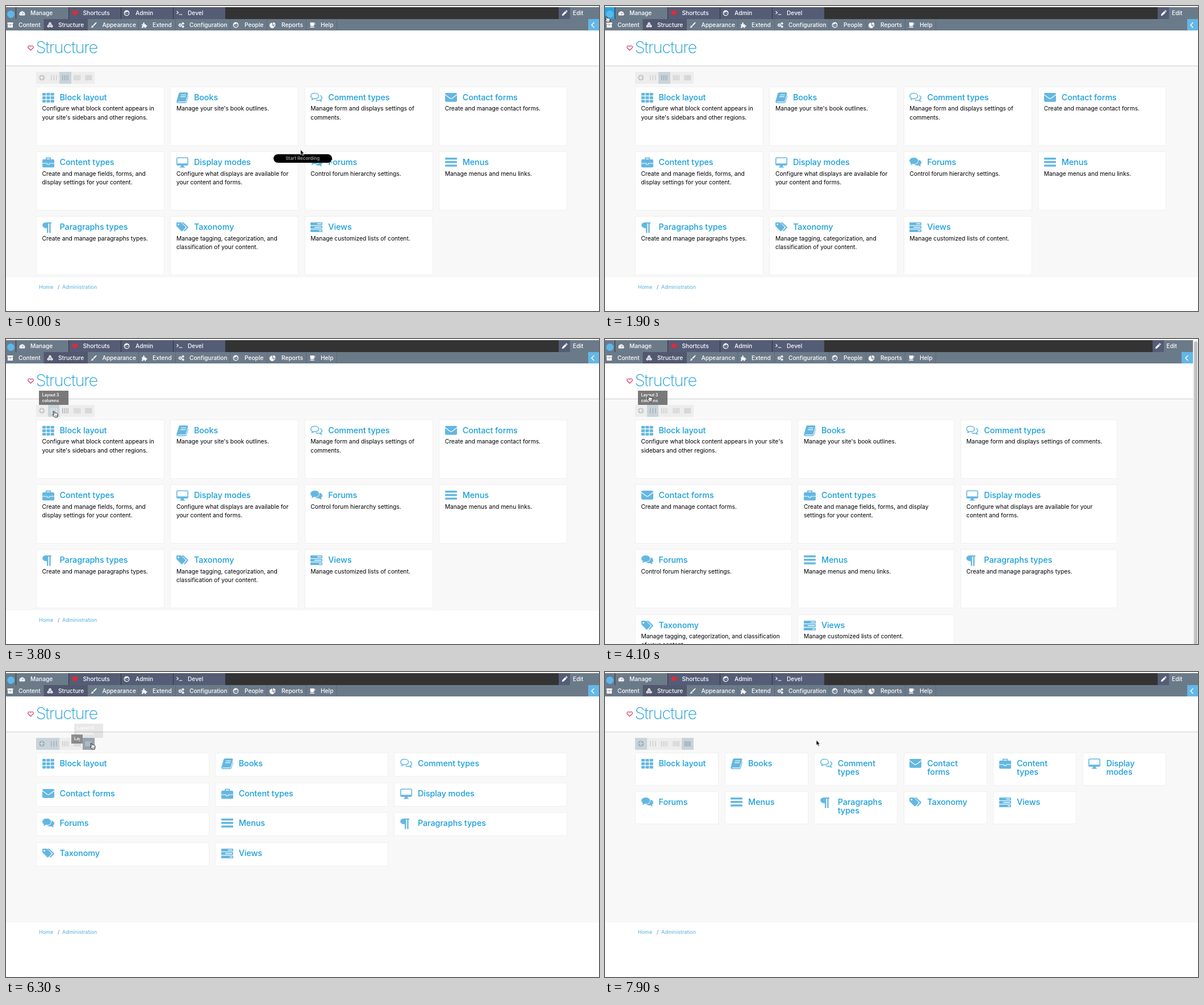
An HTML page for the animation above (8000 ms loop, 1044 by 537 pixels).

```html
<!DOCTYPE html>
<html lang="en">
<head>
<meta charset="utf-8">
<title>Structure</title>
<style>
html, body { margin: 0; width: 100%; height: 100%; overflow: hidden; background: #fff; }
body { font-family: Inter, "Open Sans", sans-serif; font-optical-sizing: none; }
#stage { position: relative; width: 1044px; height: 537px; overflow: hidden; background: #fff; }
#stage * { box-sizing: border-box; }
.abs, .tab, .tab *, .btn, .tip, .card svg, .cursor, .cursor svg { position: absolute; }
.page, .home, .cards li, .desc, .btn, .btn svg, .tip, .cursor, .cursor svg, .pill, .scroll {
  animation: 8s linear infinite; }

.page { position: absolute; inset: 0 auto 0 0; width: 1044px; animation-name: page; animation-timing-function: step-end; }
.bar { position: absolute; left: 0; right: 0; }
.top { top: 2px; height: 21px; background: #333; }
.menu { top: 23px; height: 20px; background: #6b7a89; }
.tab { top: 0; height: 100%; color: #fff; font-size: 10.2px; font-weight: 500; line-height: 21px; white-space: nowrap; }
.tab svg { top: 4.5px; width: 11px; height: 11px; overflow: visible; }
.home { position: absolute; left: 0; top: 0; width: 17px; height: 21px; background: #6b7a89; animation-name: home; }
.home i { position: absolute; left: 2px; top: 6px; width: 13px; height: 13px; border-radius: 50%; background: #5cb8ec; }
.head { position: absolute; top: 43px; left: 0; right: 0; height: 63px; border-bottom: 1px solid #ccc; }
h1 { position: absolute; left: 52.5px; top: 11.5px; margin: 0; font-size: 29px; font-weight: 200; letter-spacing: -1.25px; line-height: 36px; color: #1f9fd8; }
.main { position: absolute; top: 106px; left: 0; right: 0; }
.body { min-height: 335px; padding: 36px 55.8px 4px 53px; background: #f8f8f8; }
.cards { display: flex; flex-wrap: wrap; gap: 10.5px; margin: 0; padding: 0; list-style: none; }
.cards li { position: relative; flex: none; width: calc((100% - 31.5px) / 4 - .02px); padding: 11px 10px 15.7px 10.5px;
  background: #fff; box-shadow: inset 0 0 0 1px #f0f0f0; animation-name: cols; }
.card svg { left: 10.5px; top: 9px; width: 21px; height: 21px; overflow: visible; color: #64b7e1; }
h2 { margin: 0; padding: 0 2px 0 31px; font-size: 14.4px; font-weight: 550; letter-spacing: -.08px; line-height: 15.4px; color: #1b9fd9; }
.desc { height: 61.6px; margin: 0; padding-top: 5px; overflow: hidden; color: #000; font-size: 10.28px; line-height: 15.4px;
  animation-name: desc; animation-timing-function: step-end; }
.crumbs { padding-left: 58px; font-size: 9px; line-height: 33px; color: #55b0dc; white-space: pre; }
.crumbs span { position: absolute; }
.scroll { position: absolute; top: 2px; bottom: 0; right: 0; width: 9.5px; background: #fafafa; border-left: 1px solid #e6e6e6;
  animation-name: scroll; animation-timing-function: step-end; }
.scroll i { position: absolute; left: 1.5px; right: 1px; top: 2px; bottom: -6px; border-radius: 4px; background: #c1c1c1; }

.btn { top: 116px; width: 20.5px; height: 20.5px; background: #ededed; }
.btn svg { position: absolute; inset: 0; width: 20.5px; height: 20.5px; color: #c2c2c2; }
.b1 { animation-name: b1; } .b1 svg { animation-name: i1; }
.b3 { animation-name: b3; } .b3 svg { animation-name: i3; }
.b4 { animation-name: b4; } .b4 svg { animation-name: i4; }
.b6 { animation-name: b6; } .b6 svg { animation-name: i6; }
.tip { top: 90.5px; width: 51.5px; height: 25.5px; padding: 3px 5.5px; overflow: clip; overflow-clip-margin: content-box; opacity: 0;
  background: rgba(98, 98, 98, .85); color: #fff; font-size: 7.2px; font-weight: 600; line-height: 10.2px; }
.t3 { left: 58px; animation-name: t3; }
.t5 { left: 99.5px; animation-name: t5; }
.t6 { left: 119.5px; animation-name: t6; }
.pill { position: absolute; left: 471px; top: 260.5px; width: 102.5px; height: 15.5px; border-radius: 8px; background: #000; color: #999;
  font-size: 8px; font-weight: 600; line-height: 15.5px; text-align: center; animation-name: pill; }
.cursor { left: 0; top: 0; animation-name: move; animation-timing-function: ease-in-out; }
.cursor svg { left: 0; top: 0; width: 12px; height: 14px; overflow: visible; animation-timing-function: step-end; }
.cursor .arrow { animation-name: arrow; }
.cursor .hand { animation-name: hand; }

@keyframes page { 0%, 100% { width: 1044px } 48.85% { width: 1034.5px } 68.75% { width: 1044px } }
@keyframes scroll { 0%, 100% { opacity: 0 } 48.85% { opacity: 1 } 68.75% { opacity: 0 } }
@keyframes home { 0%, 21.5%, 28.5%, 100% { background: #6b7a89 } 22.5%, 27.5% { background: #27a6e0 } }
@keyframes cols {
  0% { width: calc((100% - 31.5px) / 4 - .02px) }
  48.81% { width: calc((100% - 31.5px) / 4 - .02px); animation-timing-function: ease }
  55.06% { width: calc((100% - 21px) / 3 - .02px) }
  81.25% { width: calc((100% - 21px) / 3 - .02px); animation-timing-function: ease }
  87.5%, 100% { width: calc((100% - 52.5px) / 6 - .02px) }
}
@keyframes desc { 0% { height: 61.6px; padding-top: 5px } 68.75%, 100% { height: 0; padding-top: 0 } }
@keyframes b1 { 0%, 68.7% { background: #ededed } 70%, 100% { background: #c9d4da } }
@keyframes i1 { 0%, 68.7% { color: #c2c2c2 } 70%, 100% { color: #9aa8b1 } }
@keyframes b3 { 0%, 43% { background: #ededed } 44.5%, 81.3% { background: #c9d4da } 84%, 100% { background: #ededed } }
@keyframes i3 { 0%, 43% { color: #c2c2c2 } 44.5%, 48.5% { color: #f4f4f4 } 50.5%, 81.3% { color: #93a1aa } 84%, 100% { color: #c2c2c2 } }
@keyframes b4 { 0%, 46.8% { background: #c9d4da } 47.4%, 100% { background: #ededed } }
@keyframes i4 { 0%, 47.5% { color: #93a1aa } 50%, 100% { color: #c2c2c2 } }
@keyframes b6 { 0%, 77.5% { background: #ededed } 78.5%, 82.5% { background: #94a4ae } 85%, 100% { background: #c9d4da } }
@keyframes i6 { 0%, 77.5% { color: #c2c2c2 } 78.5%, 82.5% { color: #c3ced5 } 85%, 100% { color: #93a1aa } }
@keyframes t3 { 0%, 43.75% { opacity: 0 } 46.25%, 51.9% { opacity: 1 } 54%, 100% { opacity: 0 } }
@keyframes t5 {
  0%, 75.5% { opacity: 0; left: 99.5px; top: 90.5px; width: 51.5px; height: 25.5px }
  77.6% { opacity: .8; left: 99.5px; top: 90.5px; width: 51.5px; height: 25.5px; animation-timing-function: step-end }
  78.2%, 79.2% { opacity: .8; left: 114.5px; top: 110.3px; width: 20.5px; height: 16px }
  80.5%, 100% { opacity: 0; left: 114.5px; top: 110.3px; width: 20.5px; height: 16px }
}
@keyframes t6 { 0%, 78.2% { opacity: 0 } 81.5%, 84.5% { opacity: 1 } 87%, 100% { opacity: 0 } }
@keyframes pill { 0%, 11.2% { opacity: 1 } 12.5%, 100% { opacity: 0 } }
@keyframes arrow { 0%, 28.75%, 83.75%, 100% { opacity: 1 } 22%, 42.5% { opacity: 0 } }
@keyframes hand { 0%, 28.75%, 83.75%, 100% { opacity: 0 } 22%, 42.5% { opacity: 1 } }
@keyframes move {
  0%, 11.25% { transform: translate(518px, 252.5px) }
  22.5%, 27.5% { transform: translate(0, 17.5px) }
  43.75%, 48.75% { transform: translate(82px, 126.5px) }
  51.25% { transform: translate(74.5px, 99px) }
  53.1% { transform: translate(70px, 97px) }
  61.25%, 70% { transform: translate(55.5px, 119.5px) }
  78.1%, 83.1% { transform: translate(148px, 124.5px) }
  96.25%, 100% { transform: translate(371.5px, 119.5px) }
}
</style>
</head>
<body>
<div id="stage">
  <div class="page">
    <div class="bar top"><div class="home"><i></i></div></div>
    <div class="bar menu"></div>
    <div class="head">
      <svg class="abs" style="left:37.5px;top:25.5px" width="11" height="10" viewBox="0 0 11 10"><path d="M5.5 9 1.4 5C-.6 2.5 2.6-.6 5.5 2.2 8.4-.6 11.6 2.5 9.6 5Z" fill="none" stroke="#d3265a" stroke-width="1.1"/></svg>
      <h1>Structure</h1>
    </div>
    <div class="main">
      <div class="body"><ul class="cards"></ul></div>
      <div class="crumbs"><span>Home</span><span style="left:91px;color:#777">/</span><span style="left:99px">Administration</span></div>
    </div>
  </div>
  <div class="scroll"><i></i></div>
  <div id="tools"></div>
  <div class="tip t3">Layout 3 columns</div>
  <div class="tip t5">Layout 5 columns</div>
  <div class="tip t6">Layout 6 columns</div>
  <div class="pill">Start Recording</div>
  <div class="cursor">
    <svg class="arrow" viewBox="0 0 12 14"><path d="M.5.5V9.6L2.6 7.7 4.1 11.2 5.8 10.4 4.3 7.1H7Z" fill="#000" stroke="#fff" stroke-width=".7"/></svg>
    <svg class="hand" viewBox="0 0 12 14"><path d="M1 1.2Q2 0 2.8 1.2L3.6 4 5 3.6 6.4 4 7.8 4.4 8.8 5.4 9 8 8 11.2H3.6L.4 7.4Q0 6.2 1.2 6.4L2.2 7Z" fill="#fff" stroke="#111" stroke-width=".95" stroke-linejoin="round"/><path d="M4.4 7.5V9.5M5.9 7.5V9.5M7.3 7.5V9.5" stroke="#111" stroke-width=".5"/></svg>
  </div>
</div>
<script>
const $ = s => document.querySelector(s);
const rect = (x, y, w, h, more = '') => `<rect x="${x}" y="${y}" width="${w}" height="${h}" ${more}/>`;
const path = (d, more = '') => `<path d="${d}" ${more}/>`;
const line = (d, w, color = 'currentColor') => path(d, `fill="none" stroke="${color}" stroke-width="${w}"`);
const svg = (size, body, style = '') => `<svg viewBox="0 0 ${size} ${size}" fill="currentColor" style="${style}">${body}</svg>`;
const rows = f => [2, 8.1, 14.2].map(f).join('');

const backBubble = 'M16.2 5.8C22 7.5 22.2 12.4 18.8 14.4Q19 16.3 20.6 17.6 17.6 17.6 15.6 15.6 11.5 16.3 8.6 14.2 16.5 13.4 16.2 5.8Z';
const frontBubble = 'M7.8 2C17.6 2 17.8 13.2 7.8 13.2L5.8 13Q4 14.8 1.2 15 2.8 13.6 2.8 11.9C-2.4 8.8 0 2 7.8 2Z';
const big = {
  grid: rows(y => [0, 7.3, 14.6].map(x => rect(x, y, 6.2, 4.8, 'rx=".8"')).join('')),
  book: path('M6.5 1.2H19Q21 1.4 20.4 3.4L16.7 15.7Q16.2 17.3 14.6 17.3H3Q2 17.5 2.4 18.4H15Q16.9 18.4 17.5 16.6L20.6 6 21 8.2 18.3 17.6Q17.5 20 15.3 20H3Q-.3 19.6.4 16.2L4.2 3Q4.8 1.2 6.5 1.2Z') + line('M8 5.5H17M7 8.6H16', 1.1, '#fff'),
  chatLine: line('M7.6 2.6C16.8 2.6 16.8 12.2 7.6 12.2L5.8 12Q4.2 13.6 2.6 13.8 3.4 12.6 3.4 11.2C-1.4 8.6.4 2.6 7.6 2.6Z', 1.5) + line('M17 6.6C21.4 8.4 21.2 12.2 18 13.8Q18.2 15.6 19.4 16.6 17.2 16.4 15.6 14.8 12.4 15.4 9.6 14.2', 1.5),
  mail: rect(0, 2, 21, 15.8, 'rx="2"') + line('M0 5 8.6 11.4Q10.5 12.8 12.4 11.4L21 5', 1.2, '#fff'),
  bag: rect(0, 5, 21, 14.2, 'rx="2"') + line('M6.9 5V2.7H14.1V5', 1.8) + line('M0 12H8.6V14H12.4V12H21', 1, '#fff'),
  screen: rect(.8, 2.2, 19.4, 12.8, 'rx="1.4" fill="none" stroke="currentColor" stroke-width="1.6"') + rect(1.5, 12.2, 18, 3) + path('M8.4 15H12.6L13.4 18.2H15V19.6H6V18.2H7.6Z'),
  chat: path(frontBubble) + path(backBubble),
  bars: rows(y => rect(0, y, 21, 3.5, 'rx="1"')),
  para: path('M6.8 2H16V4H14.6V20.5H12.2V4H10.4V20.5H8V12.2C-2.2 12.4-2.2 2 6.8 2Z'),
  tags: path('M0 3.4Q0 2 1.4 2H6.6Q8 2 9.2 3.2L15.6 9.6Q16.6 10.8 15.6 12L10.8 17Q9.6 18 8.4 17L1.2 9.8Q0 8.6 0 7.4Z') + path('M8.8 2H11Q12.4 2 13.6 3.2L20.2 9.6Q21.2 10.8 20.2 12L15.4 17Q14 18.2 12.6 16.8L17.4 12Q18.2 10.8 17.4 9.8Z') + '<circle cx="3.6" cy="5.6" r="1.5" fill="#fff"/>',
  tasks: rows((y, i) => rect(0, y, 21, 4.9, 'rx=".9"') + rect([12, 7, 15][i], y + 1.7, [7.4, 12.4, 4.4][i], 1.5, 'fill="#fff"'))
};

const cards = [
  ['grid', 'Block layout', "Configure what block content appears in your site's sidebars and other regions."],
  ['book', 'Books', "Manage your site's book outlines."],
  ['chatLine', 'Comment types', 'Manage form and displays settings of comments.'],
  ['mail', 'Contact forms', 'Create and manage contact forms.'],
  ['bag', 'Content types', 'Create and manage fields, forms, and display settings for your content.'],
  ['screen', 'Display modes', 'Configure what displays are available for your content and forms.'],
  ['chat', 'Forums', 'Control forum hierarchy settings.'],
  ['bars', 'Menus', 'Manage menus and menu links.'],
  ['para', 'Paragraphs types', 'Create and manage paragraphs types.'],
  ['tags', 'Taxonomy', 'Manage tagging, categorization, and classification of your content.'],
  ['tasks', 'Views', 'Manage customized lists of content.']
];
$('.cards').innerHTML = cards.map(([icon, title, text]) =>
  `<li class="card">${svg(21, big[icon])}<h2>${title}</h2><p class="desc">${text}</p></li>`).join('');

const cube = (x, y) => path(`M${x} ${y}l2.4-1.2 2.4 1.2v2.8l-2.4 1.2-2.4-1.2Z`) + line(`M${x} ${y}l2.4 1.2 2.4-1.2M${x + 2.4} ${y + 1.2}v2.6`, .5, '#51586f');
const gear = (x, y, r) => `<circle cx="${x}" cy="${y}" r="${r}" fill="none" stroke="currentColor" stroke-width="1.4"/><circle cx="${x}" cy="${y}" r="${r + 1}" fill="none" stroke="currentColor" stroke-width=".8" stroke-dasharray="1 1.1"/>`;
const small = {
  gauge: path('M1 9.5A5 5 0 1 1 10 9.5Z') + line('M5.5 8 7 3.8M2.2 6.4H3.4M7.8 6.4H9M3.4 3.6 4.2 4.4', .9, '#6b7a89'),
  heart: path('M5.5 10.2 1 5.8C-1.4 2.4 2.6-.6 5.5 2.2 8.4-.6 12.4 2.4 10 5.8Z', 'fill="#e02b3c"'),
  face: '<circle cx="5.5" cy="5.5" r="4.3" fill="none" stroke="currentColor" stroke-width="1.2"/>' + path('M1.6 4.4Q5 5 6.6 2.6 7.6 4.2 9.6 4.4L8.6 2 5.5 1 2.4 2Z') + '<circle cx="3.9" cy="6" r=".7"/><circle cx="7.1" cy="6" r=".7"/>',
  shell: line('M.5 2 3.4 4.5.5 7M4.6 8H10.5', 1.1),
  box: rect(.5, 1, 10, 2.8) + path('M1 4.4H10V10H1Z') + line('M4 5.8H7', .9, '#6b7a89'),
  cubes: cube(3.1, 1.8) + cube(.6, 6) + cube(5.7, 6),
  brush: path('M10.6.6Q9 .4 4.4 5.6L5.8 7Q11 2.4 10.6.6ZM3.8 6.2 5.2 7.6Q5 10.6.4 10 2 9 2 7.6 2.4 6.2 3.8 6.2Z'),
  puzzle: path('M1 4.2H3.8Q2.6 1 4.6 1T5.4 4.2H8.4V6.4Q10.6 5.4 10.6 7.2T8.4 8V10.4H6Q6.4 8.4 4.8 8.4T3.8 10.4H1V8.2Q2.6 8 2.4 7T1 6.4Z'),
  gears: gear(3.7, 5.6, 1.9) + gear(8.5, 2.8, 1) + gear(8.5, 8.3, 1),
  pie: path('M5 1.4V6L8.4 9.2A4.8 4.8 0 1 1 5 1.4Z') + path('M6.2.8A4.6 4.6 0 0 1 10.6 5.2H6.2Z') + path('M6.6 6.2H10.4Q10.2 7.8 9 8.8Z'),
  cup: path('M1.6 1H8.4V5.4Q8.2 7.4 6.4 7.4H3.6Q1.8 7.4 1.6 5.4ZM.6 8.6H9.6Q9 10 7.8 10H2.2Q1 10 .6 8.6Z') + line('M8.4 2H9.2Q10.4 2.2 10.2 3.6T8.4 5', 1),
  pen: path('M.8 10.2 1.4 7.2 6.6 2 9 4.4 3.8 9.6ZM7.2 1.4 8 .6Q8.6.2 9.2.8L10.2 1.8Q10.8 2.4 10.4 3L9.6 3.8Z')
};

// left, width, background, icon, icon x, label, label x
const tab = ([x, w, bg, icon, ix, label, tx]) =>
  `<div class="tab" style="left:${x}px;width:${w}px;background:${bg}">${svg(11, small[icon], `left:${ix - x}px`)}<span style="left:${tx - x}px">${label}</span></div>`;
$('.top').insertAdjacentHTML('beforeend', [
  [18, 91.5, '#6b7a89', 'gauge', 23, 'Manage', 43],
  [110.5, 91, '#545c76', 'heart', 115.5, 'Shortcuts', 135.5],
  [202.5, 91.5, '#545c76', 'face', 206.5, 'Admin', 228],
  [295, 91, '#545c76', 'shell', 299.5, 'Devel', 320]
].map(tab).join('') +
  `<div class="tab" style="right:0;width:71px;background:linear-gradient(90deg,#545c76 20px,#6b7a89 20px)">${svg(11, small.pen, 'left:4.5px')}<span style="left:25px">Edit</span></div>`);

const edge = 'none;border-right:1px solid #5d6a78';
$('.menu').innerHTML = [
  [0, 67, edge, 'box', 1.5, 'Content', 22],
  [67, 76.5, '#51586f', 'cubes', 71.5, 'Structure', 92],
  [143.5, 90, edge, 'brush', 148.5, 'Appearance', 169.5],
  [233.5, 65, edge, 'puzzle', 237.5, 'Extend', 258],
  [298.5, 96, edge, 'gears', 303, 'Configuration', 323],
  [394.5, 65, edge, 'face', 399, 'People', 420],
  [459.5, 69, edge, 'pie', 464, 'Reports', 485],
  [528.5, 54, edge, 'cup', 534, 'Help', 554]
].map(tab).join('') +
  `<div class="tab" style="right:0;width:19.5px;background:#64b7e6">${svg(11, line('M7.4 1 3 5.5 7.4 10', 1.4), 'left:3.5px')}</div>`;

const ring = '<circle cx="10.2" cy="10.2" r="3.7" fill="none" stroke="currentColor" stroke-width="2.6"/>' +
  line('M6.2 10.2H8M12.4 10.2H14.2M10.2 6.2V8M10.2 12.4V14.2', 1.3, '#e9eef0');
const stripes = n => {
  const gap = [4.5, 3.2, 2.5, 2][n - 3];
  return Array.from({ length: n }, (_, i) => rect(9.75 + (i - (n - 1) / 2) * gap, 5.6, 1, 9.4)).join('');
};
$('#tools').innerHTML = [1, 3, 4, 5, 6].map((n, i) =>
  `<div class="btn b${n}" style="left:${53 + i * 20.5}px">${svg(20.5, n === 1 ? ring : stripes(n))}</div>`).join('');
</script>
</body>
</html>
```
